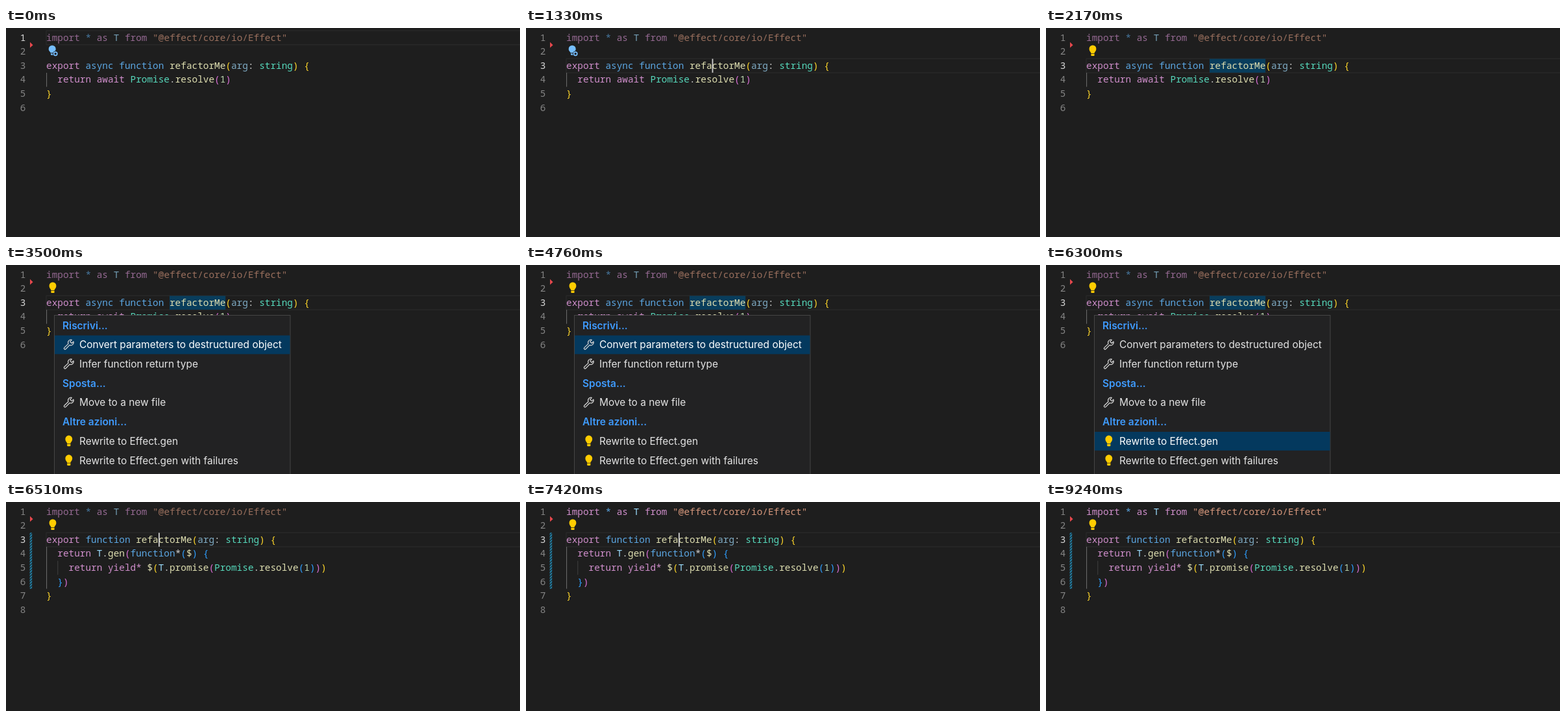
An HTML page for the animation above (9.31 s loop, 792x322 px).

```html
<!DOCTYPE html>
<html lang="en">
<head>
<meta charset="utf-8">
<title>Editor refactoring</title>
<style>
  html, body { margin: 0; width: 100%; height: 100%; overflow: hidden; background: #1e1e1e; }
  svg { display: block; width: 792px; height: 322px; }
  .code text { font: 14.4px "Noto Sans Mono", "DejaVu Sans Mono", monospace; white-space: pre; font-variant-ligatures: none; }
  .menu text { font: 15.46px Inter, "Liberation Sans", sans-serif; fill: #e4e4e4; }
  .menu .header { font-weight: 600; fill: #3f9bff; }
</style>
</head>
<body>
<svg viewBox="0 0 792 322">
  <defs>
    <pattern id="hatch" width="3" height="3" patternUnits="userSpaceOnUse" patternTransform="rotate(-45)">
      <rect width="3" height="1.7" fill="#2090bd"/>
    </pattern>
    <g id="bulb">
      <path fill="#ffcc00" d="M-2.6 4 C-2.6 2 -5.4 0.9 -5.4 -3 A5.4 5.4 0 0 1 5.4 -3 C5.4 0.9 2.6 2 2.6 4Z M-2.6 4.8H2.6V7Q2.6 8.2 1.4 8.2H-1.4Q-2.6 8.2 -2.6 7Z"/>
    </g>
    <g id="wrench">
      <path fill="none" stroke="#d4d4d4" stroke-width="1.1" stroke-linejoin="round" transform="translate(-8.8 -8.8) scale(1.1)"
        d="M14.5 3.9 L12 6.2 L9.8 4.1 L12.1 1.5 A4 4 0 0 0 7.3 7 L1.7 12.4 A1.35 1.35 0 0 0 3.7 14.4 L9.1 8.8 A4 4 0 0 0 14.5 3.9Z"/>
    </g>
  </defs>
  <rect width="792" height="322" fill="#1e1e1e"/>
  <rect id="currentLine" x="62" width="740" height="21.6" fill="none" stroke="#292929" stroke-width="1.4"/>
  <rect id="wordMark" x="252" y="47.5" width="86.2" height="21.3" fill="#083d5c"/>
  <g id="numbers" class="code"></g>
  <path d="M37 21.8 L41.6 26.2 L37 30.6Z" fill="#e5484d"/>
  <g id="importLine" class="code"></g>
  <g id="before" class="code">
    <path d="M62.6 69V90.6" stroke="#707070"/>
  </g>
  <g id="after" class="code">
    <rect x="36.6" y="47.3" width="3.6" height="86.4" fill="url(#hatch)"/>
    <path d="M62.6 69V133.7" stroke="#707070"/>
    <path d="M79.8 90.6V112.2" stroke="#404040"/>
  </g>
  <g id="blueBulb" fill="#75beff" transform="translate(0 -0.4)">
    <path d="M68.6 38.7 C68.6 37 65.7 36 65.7 32.6 A5.5 5.5 0 0 1 76.7 32.6 C76.7 36 73.8 37 73.8 38.7Z M68.6 39.6H73.8V42.2H69.6Z"/>
    <circle cx="76.2" cy="40.2" r="4.3" fill="#1e1e1e"/>
    <circle cx="76.2" cy="40.2" r="2.6" fill="none" stroke="#75beff" stroke-width="1.7"/>
  </g>
  <use id="yellowBulb" href="#bulb" x="72" y="34.9"/>
  <rect id="cursor" y="47.5" width="1.8" height="21.3" fill="#d0d0d0"/>
  <g id="menu" class="menu">
    <rect x="74.5" y="77.5" width="363.5" height="290" fill="#222223" stroke="#454545"/>
    <rect id="focus" x="75" width="362.6" height="28.8" fill="#04395e"/>
  </g>
</svg>
<script>
const LOOP = 9310, LINE = 21.6, TOP = 4.1, ROW = 29.7;
const CLICK = 1330, MARK = 1610, OPEN = 3220, LEAVE = 4900, HOVER = 5700, APPLY = 6440, CHECKED = 7070;
const COLORS = {
  keyword: '#cf8ecb', storage: '#5ba6e2', name: '#dedeb0', variable: '#9cdcfe', type: '#56d8bb',
  plain: '#d4d4d4', string: '#d6977c', number: '#b9d3ac', gold: '#ffd72a', pink: '#da70d6', blue: '#2f9fff',
  unused: '#7fabc4'
};
const byId = id => document.getElementById(id);

function add(parent, tag, attrs, content = '') {
  const node = document.createElementNS('http://www.w3.org/2000/svg', tag);
  for (const key in attrs) node.setAttribute(key, attrs[key]);
  node.textContent = content;
  return parent.appendChild(node);
}

const baseline = line => TOP + LINE * (line - 1) + 15.5;

// Tokens are written as "color:text", parted by "|".
function addLine(group, line, source) {
  const text = add(byId(group), 'text', { x: 62, y: baseline(line) });
  for (const token of source.split('|')) {
    const cut = token.indexOf(':');
    add(text, 'tspan', { fill: COLORS[token.slice(0, cut)] }, token.slice(cut + 1));
  }
}

addLine('importLine', 1, 'keyword:import |storage:* |keyword:as |variable:T |keyword:from |string:"@effect/core/io/Effect"');

const signature = 'name:refactorMe|gold:(|unused:arg|plain:: |type:string|gold:) {';
addLine('before', 3, 'keyword:export |storage:async function |' + signature);
addLine('before', 4, 'keyword:  return await |type:Promise|plain:.|name:resolve|pink:(|number:1|pink:)');
addLine('before', 5, 'gold:}');

addLine('after', 3, 'keyword:export |storage:function |' + signature);
addLine('after', 4, 'keyword:  return |variable:T|plain:.|name:gen|pink:(|storage:function|plain:*|blue:(|name:$|blue:) {');
addLine('after', 5, 'keyword:    return yield* |name:$|gold:(|variable:T|plain:.|name:promise|pink:(|type:Promise|plain:.|name:resolve|blue:(|number:1|blue:)|pink:)|gold:)');
addLine('after', 6, 'blue:  }|pink:)');
addLine('after', 7, 'gold:}');

const numbers = Array.from({ length: 8 }, (_, i) =>
  add(byId('numbers'), 'text', { x: 30.5, y: baseline(i + 1), 'text-anchor': 'end' }, i + 1));

const rowY = row => 93.2 + ROW * row;
const rows = [
  ['', 'Riscrivi...'],
  ['wrench', 'Convert parameters to destructured object'],
  ['wrench', 'Infer function return type'],
  ['', 'Sposta...'],
  ['wrench', 'Move to a new file'],
  ['', 'Altre azioni...'],
  ['bulb', 'Rewrite to Effect.gen'],
  ['bulb', 'Rewrite to Effect.gen with failures'],
  ['bulb', '']
];
const labels = rows.map(([icon, label], row) => {
  if (icon) add(byId('menu'), 'use', { href: '#' + icon, x: 96.8, y: rowY(row) - 0.4 });
  return add(byId('menu'), 'text', { x: icon ? 113 : 87, y: rowY(row) + 5.4, class: icon ? 'item' : 'header' }, label);
});

const show = (id, visible) => byId(id).setAttribute('visibility', visible ? 'inherit' : 'hidden');
const within = (t, from, to) => t >= from && t < to;

function cursorVisible(t) {
  return within(t, CLICK, 1890) || within(t, 2380, 2870) ||
    within(t, APPLY, 6930) || within(t, 7420, 7980) || within(t, 8470, 9030);
}

function focusedRow(t) {
  if (t < LEAVE) return 1;
  return t < HOVER ? 0 : 6;
}

function render(t) {
  const clicked = t >= CLICK, applied = t >= APPLY;
  const activeLine = clicked ? 3 : 1;
  const row = focusedRow(t);

  byId('currentLine').setAttribute('y', TOP + LINE * (activeLine - 1));
  numbers.forEach((node, i) => {
    node.setAttribute('fill', i + 1 === activeLine ? '#d8d8d8' : '#858585');
    node.setAttribute('visibility', i < 6 || applied ? 'inherit' : 'hidden');
  });
  byId('importLine').setAttribute('opacity', t < CHECKED ? 0.667 : 1);

  show('before', !applied);
  show('after', applied);
  show('wordMark', within(t, MARK, APPLY));
  show('blueBulb', t < MARK);
  show('yellowBulb', t >= MARK);
  show('cursor', cursorVisible(t));
  byId('cursor').setAttribute('x', applied ? 235 : 286.6);

  const open = within(t, OPEN, APPLY);
  show('menu', open);
  show('focus', open && row > 0);
  byId('focus').setAttribute('y', rowY(row) - 14.4);
  labels.forEach((label, i) => { label.style.fill = row && i === row ? '#ffffff' : ''; });
}

const start = performance.now();
function tick() {
  render((performance.now() - start) % LOOP);
  requestAnimationFrame(tick);
}
render(0);
requestAnimationFrame(tick);
</script>
</body>
</html>
```
